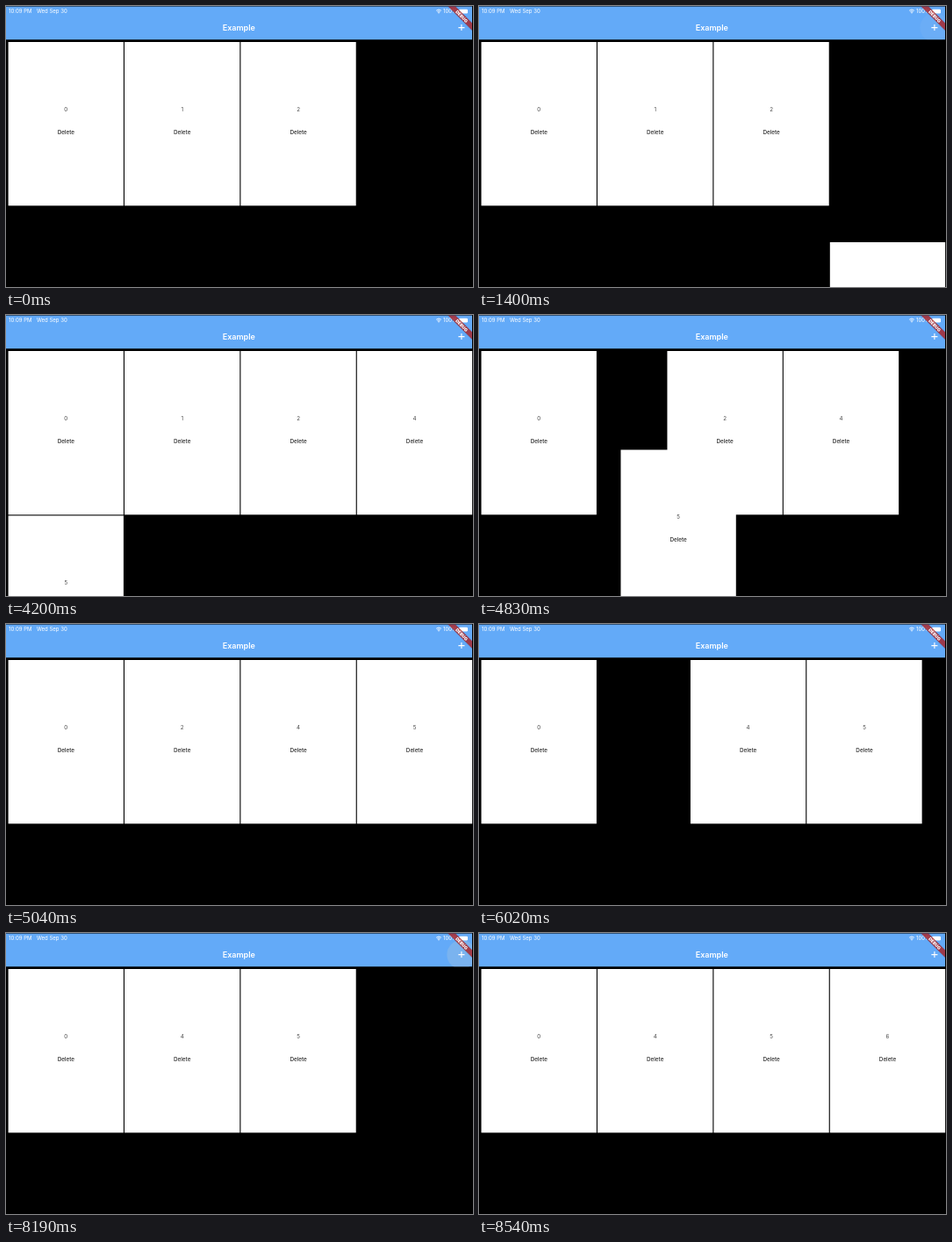
Recreate the animation shown at these times as an HTML page. Size 532x320 px, loop 9590 ms.

```html
<!DOCTYPE html>
<html lang="en">
<head>
<meta charset="utf-8">
<title>Example</title>
<style>
  html, body { margin: 0; width: 100%; height: 100%; overflow: hidden; background: #000; }
  svg { display: block; width: 532px; height: 320px; font-family: Inter, Roboto, sans-serif; }
  .mid { text-anchor: middle; }
  .status { font-size: 6px; fill: #fff; }
</style>
</head>
<body>
<svg viewBox="0 0 532 320">
  <defs>
    <clipPath id="bar"><rect y="0.5" width="531" height="38"/></clipPath>
  </defs>
  <rect width="532" height="320"/>
  <g id="cards"></g>
  <g clip-path="url(#bar)">
    <rect width="531" height="38.5" fill="#63aaf8"/>
    <text class="status" x="3" y="8.2" textLength="">10:09 PM</text>
    <text class="status" x="35" y="8.2">Wed Sep 30</text>
    <g fill="none" stroke="#fff" stroke-width="0.9">
      <path d="M490.2 5.2Q493 2.8 495.8 5.2M491.4 6.6Q493 5.2 494.6 6.6"/>
    </g>
    <circle cx="493" cy="7.7" r="0.7" fill="#fff"/>
    <text class="status" x="498" y="8.2">100%</text>
    <rect x="516" y="3.8" width="10" height="4.6" rx="1.2" fill="#fff"/>
    <text class="mid" x="265.3" y="28" font-size="9" font-weight="600" fill="#fff">Example</text>
    <circle id="ripple" cx="518.8" cy="24.6" r="16.5" fill="#c4cfd2"/>
    <path d="M515.4 24.6h7M518.9 21.1v7" stroke="#fff" stroke-width="1.1"/>
    <g transform="translate(531 0) rotate(45)">
      <rect x="-19.7" y="13.4" width="39.4" height="6.7" fill="#000" opacity="0.14"/>
      <rect x="-19.7" y="13.8" width="39.4" height="5.9" fill="#b71c1c" opacity="0.74"/>
      <text class="mid" y="18.6" font-size="5" font-weight="900" fill="#fff">DEBUG</text>
    </g>
  </g>
</svg>
<script>
const LOOP = 9590, STEP = 70, SLIDE = 350, RISE = 285;
const NS = "http://www.w3.org/2000/svg";

// Start time of each list state and the cards it holds
const states = [
  [-SLIDE, [0, 1, 2]],
  [1330, [0, 1, 2, 4]],
  [2870, [0, 1, 2, 4, 5]],
  [4690, [0, 2, 4, 5]],
  [5950, [0, 4, 5]],
  [8190, [0, 4, 5, 6]]
];
const taps = [1260, 2800, 8190];

function add(parent, tag, attrs, text = "") {
  const el = document.createElementNS(NS, tag);
  for (const key in attrs) el.setAttribute(key, attrs[key]);
  el.textContent = text;
  parent.appendChild(el);
  return el;
}

function makeCard(id) {
  const g = add(document.getElementById("cards"), "g", {});
  add(g, "rect", { width: 131.3, height: 186.4, fill: "#fff" });
  add(g, "text", { class: "mid", x: 65.7, y: 78.9, "font-size": 6.2, fill: "#444" }, id);
  add(g, "text", { class: "mid", x: 65.7, y: 104.6, "font-size": 6.3, "font-weight": 500, fill: "#2c2c2c" }, "Delete");
  return { id, g };
}

const cards = [0, 1, 2, 4, 5, 6].map(makeCard);
const ripple = document.getElementById("ripple");

const slot = i => ({ x: 2.6 + (i % 4) * 132.4, y: 41 + Math.floor(i / 4) * 187.5 });
const mix = (a, b, k) => a + (b - a) * k;

function draw(t) {
  let now = states.length - 1;
  while (states[now][0] > t) now--;
  const [start, order] = states[now];
  const before = now ? states[now - 1][1] : order;
  const k = Math.min(1, (t - start) / SLIDE);

  for (const { id, g } of cards) {
    const index = order.indexOf(id);
    g.setAttribute("visibility", index < 0 ? "hidden" : "visible");
    if (index < 0) continue;
    const to = slot(index);
    const old = before.indexOf(id);
    const from = old < 0 ? { x: to.x, y: to.y + RISE } : slot(old);
    g.setAttribute("transform", `translate(${mix(from.x, to.x, k)} ${mix(from.y, to.y, k)})`);
  }

  const tap = taps.filter(s => s <= t).pop();
  const glow = tap === undefined ? 0 : Math.max(0, 1 - (t - tap) / 210);
  ripple.setAttribute("opacity", glow * 0.24);
}

function frame() {
  const t = performance.now() % LOOP;
  draw(Math.floor(t / STEP) * STEP);
  requestAnimationFrame(frame);
}
frame();
</script>
</body>
</html>
```
